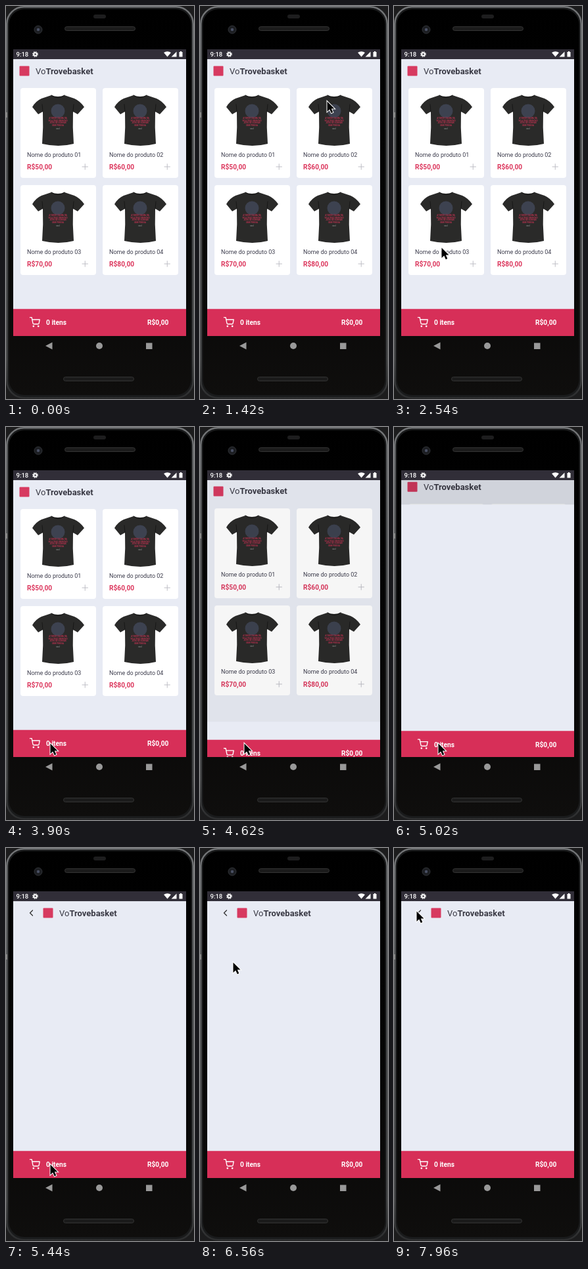
Animation of 286x599 px, one loop 8 s. Source, as an HTML page:

```html
<!DOCTYPE html>
<html lang="pt">
<head>
<meta charset="utf-8">
<style>
  html, body { margin: 0; width: 100%; height: 100%; overflow: hidden; background: #1c1c1d; }
  body > svg { display: block; width: 286px; height: 599px; }
  text { font-family: Roboto, Arial, sans-serif; }
  .title { font-size: 13px; fill: #3a3a45; }
  .name { font-size: 9px; fill: #3d3d4d; }
  .price, .total { font-size: 10.2px; font-weight: 700; fill: #dc385e; }
  .total { fill: #fff; }
  .print { font-size: 3px; font-weight: 700; fill: #b8324f; text-anchor: middle; }
  .line { fill: none; stroke-linecap: round; stroke-linejoin: round; }
</style>
</head>
<body>
<svg viewBox="0 0 286 599">
  <defs>
    <linearGradient id="rim" x2="0" y2="1">
      <stop stop-color="#737577"/><stop offset=".3" stop-color="#5a5c5e"/><stop offset=".9" stop-color="#4a4b4c"/><stop offset="1" stop-color="#2c2d2e"/>
    </linearGradient>
    <linearGradient id="glass" x2="0" y2="1">
      <stop/><stop offset=".5" stop-color="#040404"/><stop offset="1" stop-color="#0f0e0d"/>
    </linearGradient>
    <g id="shirt">
      <path fill="#2a2a29" d="M69 136Q79 140 89 136L104 141Q113 145 119 154L109 165L102 161Q101 185 103 210Q80 216 55 210Q57 185 56 161L49 165L40 154Q45 145 54 141Z"/>
      <path class="line" stroke="#171717" d="M69 136Q79 144 89 136M56 161L55 150M102 161L103 150"/>
      <circle cx="79" cy="160" r="10.5" fill="#3d4250"/>
      <g class="print">
        <text x="79" y="171.8">A TARDE CALMA DA</text>
        <text x="79" y="175.6">VILA TRAZ UM NOVO</text>
        <text x="79" y="179.4">JEITO DE SONHAR</text>
        <text x="79" y="183.2">SEM PRESSA</text>
        <text x="79" y="188" style="fill:#777">azul</text>
      </g>
    </g>
    <g id="brand">
      <rect x="20.5" y="91.5" width="15" height="15" rx="1" fill="#d73a60"/>
      <text class="title" x="45" y="103.5">Vo<tspan font-weight="700">Trovebasket</tspan></text>
    </g>
    <g id="cart">
      <path fill="#d72f58" d="M11 461.700H274V503H11Z"/>
      <g class="line" stroke="#fff" stroke-width="2" transform="translate(35.8 474) scale(.67)">
        <circle cx="9" cy="21" r="1"/><circle cx="20" cy="21" r="1"/>
        <path d="M1 1h4l2.7 13.4a2 2 0 0 0 2 1.6h9.7a2 2 0 0 0 2-1.6L23 6H6"/>
      </g>
      <text class="total" x="61" y="486">0 itens</text>
      <text class="total" x="215" y="486">R$0,00</text>
    </g>
    <path id="page" fill="#e8ebf4" d="M11 81H274V503H11Z"/>
  </defs>

  <!-- phone body -->
  <rect x="1.25" y="1.25" width="283.5" height="596" rx="26" fill="#1a1b1c" stroke="url(#rim)" stroke-width="2.5"/>
  <rect x="4.500" y="5" width="277" height="588" rx="23" fill="url(#glass)"/>
  <path fill="#888" d="M0 162H2V170H0Z"/>
  <rect x="133" y="13" width="19" height="6" rx="3" fill="#1d1d1e"/>
  <g fill="#1b1b1b" stroke="#343434">
    <rect x="89.5" y="31.5" width="107" height="6" rx="3"/>
    <rect x="87.5" y="565.5" width="107" height="6" rx="3"/>
  </g>
  <circle cx="49" cy="36" r="6" fill="#1c1e22" stroke="#303236"/>
  <circle cx="49" cy="36" r="2.2" fill="#4a5064"/>
  <g fill="#999">
    <path d="M60 518L70.5 512.5V523.5Z"/><circle cx="142" cy="518" r="5"/><path d="M213 513.5h9.5v9.5h-9.5Z"/>
  </g>

  <!-- status bar -->
  <path fill="#312e38" d="M11 66H274V81H11Z"/>
  <text x="15.5" y="77" font-size="9.5" font-weight="500" fill="#fff">9:18</text>
  <circle cx="44.5" cy="73.5" r="2.3" fill="none" stroke="#fff" stroke-width="2"/>
  <circle cx="44.5" cy="73.5" r="3.8" fill="none" stroke="#fff" stroke-width="1.2" stroke-dasharray="1.6 1.384"/>
  <path fill="#fff" d="M240 71Q245.500 67.500 251 71L245.500 77.500ZM251.500 77.500L259.500 69.500V77.500ZM263.500 70H265V69H267V70H268.500V77.500H263.500Z"/>

  <svg x="11" y="81" width="263" height="422" viewBox="11 81 263 422">
    <g id="shop">
      <use href="#page"/><use href="#brand"/><g id="cards"></g><use href="#cart"/>
    </g>
    <path id="shade" d="M11 81H274V503H11Z" opacity="0"/>
    <svg id="reveal" x="11" y="503" width="263" height="422" viewBox="11 81 263 422">
      <g id="basket">
        <use href="#page"/><use href="#brand" x="36"/><use href="#cart"/>
        <path class="line" stroke="#333" stroke-width="1.3" d="M40.500 95L36.500 99L40.500 103"/>
      </g>
    </svg>
  </svg>

  <path id="cursor" fill="#000" stroke="#fff" stroke-width="2" paint-order="stroke" d="M.5 1.500V17L4.200 13.600L6.800 19.200L9.300 18L6.800 12.500H11.500Z"/>
</svg>
<script>
const el = id => document.getElementById(id);
const LOOP = 8000, HEIGHT = 422, TOP = 81;

el('cards').innerHTML = [0, 1, 2, 3].map(i => `
  <g transform="translate(${i % 2 * 125} ${(i >> 1) * 148})">
    <rect x="22" y="125" width="115" height="137" rx="4" fill="#fff"/>
    <use href="#shirt"/>
    <text class="name" x="32" y="229.5">Nome do produto 0${i + 1}</text>
    <text class="price" x="32" y="249">R$${i + 5}0,00</text>
    <path class="line" stroke="#bfbfc6" d="M116 245h8.500M120.250 240.750v8.500"/>
  </g>`).join('');

// time, x, y: the pointer jumps from place to place
const pointer = [
  [1420, 193, 144], [1700, 132, 165], [1980, 102, 188], [2260, 73, 279], [2540, 72, 367],
  [2820, 74, 458], [3100, 72, 474], [3380, 67, 481], [5720, 79, 403], [6000, 84, 295],
  [6280, 72, 222], [6560, 50, 173], [6840, 31, 129], [7120, 27, 112], [7400, 26, 103],
  [7680, 28, 96], [7960, 34, 95]
];

// time, share of the transition: it stutters a little
const pace = [[4620, .081], [4780, .32], [4880, .32], [5020, .48], [5440, .93], [5720, 1]];

function progress(t) {
  if (t < pace[0][0]) return 0;
  const i = pace.findIndex(k => k[0] > t);
  if (i < 0) return 1;
  const [t0, a] = pace[i - 1], [t1, b] = pace[i];
  return ease(a + (b - a) * (t - t0) / (t1 - t0));
}

// cubic-bezier(.35, .45, 0, 1)
function ease(x) {
  const bezier = (s, a, b) => 3 * (1 - s) ** 2 * s * a + 3 * (1 - s) * s * s * b + s ** 3;
  let lo = 0, hi = 1;
  for (let i = 0; i < 25; i++) {
    const mid = (lo + hi) / 2;
    if (bezier(mid, .35, 0) < x) lo = mid; else hi = mid;
  }
  return bezier(lo, .45, 1);
}

const move = (id, x, y) => el(id).setAttribute('transform', `translate(${x} ${y})`);

function draw() {
  const t = Math.floor(performance.now() % LOOP / 20) * 20;
  const p = progress(t), rest = HEIGHT * (1 - p);
  move('shop', 0, -.02 * HEIGHT * p);
  el('shade').setAttribute('opacity', .1 * Math.min(1, p / .36));
  el('reveal').setAttribute('y', TOP + rest);
  move('basket', 0, -.959 * rest);

  const spot = pointer.filter(k => k[0] <= t).pop();
  el('cursor').style.display = spot ? '' : 'none';
  if (spot) move('cursor', spot[1], spot[2]);
  requestAnimationFrame(draw);
}
draw();
</script>
</body>
</html>
```
